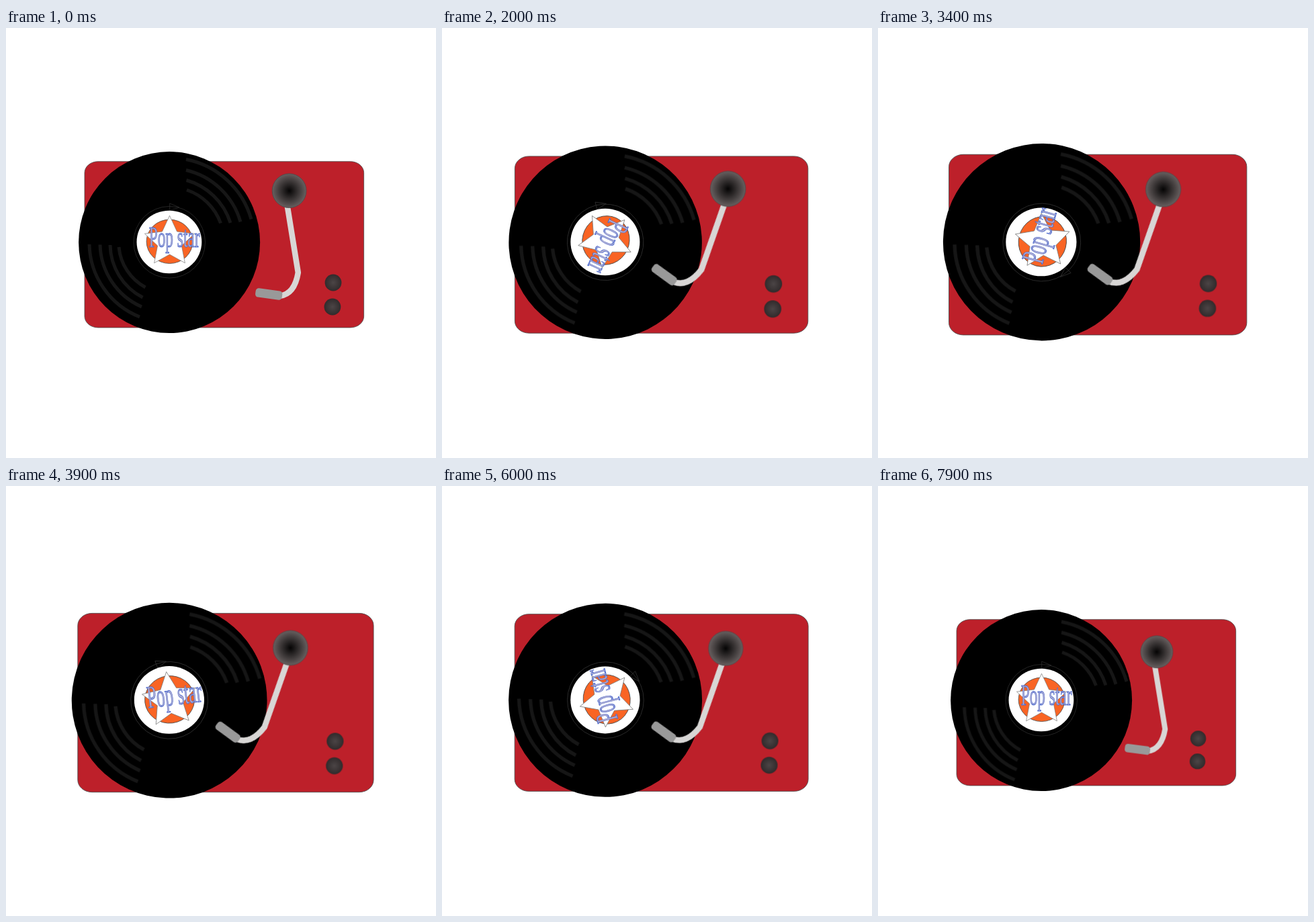
Recreate the animation shown at these times as an HTML page. Size 640 by 640 pixels, loop 8 s.

```html
<!DOCTYPE html>
<html lang="en">
<head>
<meta charset="utf-8">
<title>Record player</title>
<style>
@property --pulse { syntax: '<number>'; inherits: true; initial-value: 0; }
@property --size { syntax: '<number>'; inherits: true; initial-value: 1; }
@property --turn { syntax: '<angle>'; inherits: true; initial-value: 0deg; }

html, body { margin: 0; width: 100%; height: 100%; overflow: hidden; background: #fff; }
svg {
  display: block; width: 100%; height: 100%;
  --smooth: cubic-bezier(.3333, 0, .6667, 1);
  animation: pulse 8s var(--smooth) infinite, size 8s var(--smooth) infinite, turn 8s var(--smooth) infinite;
}

.body { transform-origin: 289px 319px; transform: scale(calc(1 + .77 * var(--pulse)), calc(1 + var(--pulse))); }
.record { transform-origin: 243.3px 319px; transform: scale(calc(1 + var(--pulse))); }
.controls { transform-origin: 303px 324px; transform: scale(calc(var(--size) * (1 + var(--pulse)))); }
.vinyl { transform-origin: 243.4px 319px; transform: rotate(calc(3 * var(--turn))); }
.label { transform-origin: 244.2px 317.1px; transform: rotate(var(--turn)); }
.arm { transform-origin: 420.1px 260px; animation: arm 8s var(--smooth) infinite; }
.upper { animation: upper 8s var(--smooth) infinite; }
.lower { animation: lower 8s var(--smooth) infinite; }

.groove { fill: none; stroke: #161616; stroke-width: 5; }
.line { stroke: #4a4a4a; stroke-width: .8; }
text {
  font: 44px "Liberation Serif", "Times New Roman", serif;
  fill: #b3b0d2; stroke: #4566d0; stroke-width: .8; vector-effect: non-scaling-stroke;
}

@keyframes pulse {
  0%, 12.5% { --pulse: 0; }
  22.5% { --pulse: .071; }
  33.75% { --pulse: .022; }
  40% { --pulse: .089; }
  48.75% { --pulse: .077; }
  61.25% { --pulse: .007; }
  79.375% { --pulse: .077; }
  87.5%, 100% { --pulse: 0; }
}
@keyframes size {
  0%, 16.25% { --size: 1; }
  33.75%, 100% { --size: .943; }
}
@keyframes turn {
  0% { --turn: 0deg; }
  98.75%, 100% { --turn: 720deg; }
}
@keyframes arm {
  0% { transform: rotate(0deg); }
  12.5%, 87.5% { transform: rotate(28.5deg); }
  98.75%, 100% { transform: rotate(0deg); }
}
@keyframes upper {
  0% { transform: translate(0, 0); }
  16.25% { transform: translate(4.7px, 6.2px); }
  33.75% { transform: translate(-.4px, 0); }
  48.75% { transform: translate(3.1px, 4.3px); }
  61.25% { transform: translate(.5px, .8px); }
  75% { transform: translate(1.5px, 3px); }
  98.75%, 100% { transform: translate(5px, 6.5px); }
}
@keyframes lower {
  0% { transform: translate(0, 0); }
  16.25% { transform: translate(2.8px, 5.6px); }
  33.75% { transform: translate(-.2px, -2.1px); }
  48.75% { transform: translate(.6px, 1.2px); }
  61.25% { transform: translate(3.5px, 5.5px); }
  75% { transform: translate(-1.5px, -5.3px); }
  98.75%, 100% { transform: translate(4.5px, 7.3px); }
}
</style>
</head>
<body>
<svg viewBox="0 0 640 640">
  <defs>
    <radialGradient id="knob">
      <stop offset="0" stop-color="#050404"/>
      <stop offset="1" stop-color="#686060"/>
    </radialGradient>
    <radialGradient id="button">
      <stop offset="0" stop-color="#4c4546"/>
      <stop offset="1" stop-color="#312b2c"/>
    </radialGradient>
  </defs>

  <rect class="body line" x="117" y="198.7" width="415.6" height="247.2" rx="20" ry="16.8" fill="#bd202a"/>

  <g class="record">
    <g class="vinyl">
      <circle cx="243.1" cy="319.1" r="135"/>
      <g fill="none" stroke="#2e2e2e" stroke-width=".8">
        <circle cx="243.2" cy="318.8" r="53.3"/>
        <path d="M243.7 261L258 267L243.7 271.5Z"/>
      </g>
    </g>
    <g class="groove upper">
      <path d="M268 195.5A126 126 0 0 1 365 284.5"/>
      <path d="M268 211.5A110.5 110.5 0 0 1 349 288.5"/>
      <path d="M268.5 226.5A96 96 0 0 1 334 290"/>
      <path d="M269 241A81.7 81.7 0 0 1 319.5 290.5"/>
    </g>
    <g class="groove lower">
      <path d="M124 322A119.3 119.3 0 0 0 199 430"/>
      <path d="M140 322.5A104 104 0 0 0 202 415"/>
      <path d="M155 323A89.5 89.5 0 0 0 203.5 401"/>
      <path d="M168 326A75.7 75.7 0 0 0 207.5 386"/>
    </g>
    <ellipse cx="242.9" cy="318.5" rx="48.4" ry="46.8" fill="#fff"/>
    <g class="label">
      <ellipse class="line" cx="243.5" cy="317.8" rx="34.4" ry="32.7" fill="#f96424"/>
      <path id="star" fill="#fff" stroke="#777" stroke-width=".7"/>
      <text transform="translate(212.7 326) scale(.53 1)">Pop star</text>
    </g>
  </g>

  <g class="controls">
    <g class="arm">
      <path d="M417.6 258L434.8 364Q429.6 396 407.6 398.8" fill="none" stroke="#d8d6d5" stroke-width="8.5"/>
      <rect x="371.2" y="389.3" width="40" height="13.4" rx="4.5" fill="#999" transform="rotate(7.5 391.2 396)"/>
    </g>
    <circle class="line" cx="421.6" cy="242.2" r="25.4" fill="url(#knob)"/>
    <circle cx="487" cy="379" r="12.4" fill="url(#button)"/>
    <circle cx="485.9" cy="415" r="12.4" fill="url(#button)"/>
  </g>
</svg>
<script>
const corners = Array.from({ length: 10 }, (_, i) => {
  const r = i % 2 ? 18.8 : 39;
  const a = (i / 5 - .5) * Math.PI;
  return [243.5 + r * Math.cos(a), 318.2 + r * Math.sin(a)].map(v => v.toFixed(2)).join(' ');
});
document.getElementById('star').setAttribute('d', `M${corners.join('L')}Z`);

// The motion advances in tenths of a second.
const LOOP = 8000, STEP = 100;
const anims = document.getAnimations();
anims.forEach(a => a.pause());
const start = performance.now();
function tick() {
  const t = (performance.now() - start + 4) % LOOP;
  const held = Math.floor(t / STEP) * STEP;
  anims.forEach(a => { a.currentTime = held; });
  requestAnimationFrame(tick);
}
tick();
</script>
</body>
</html>
```
